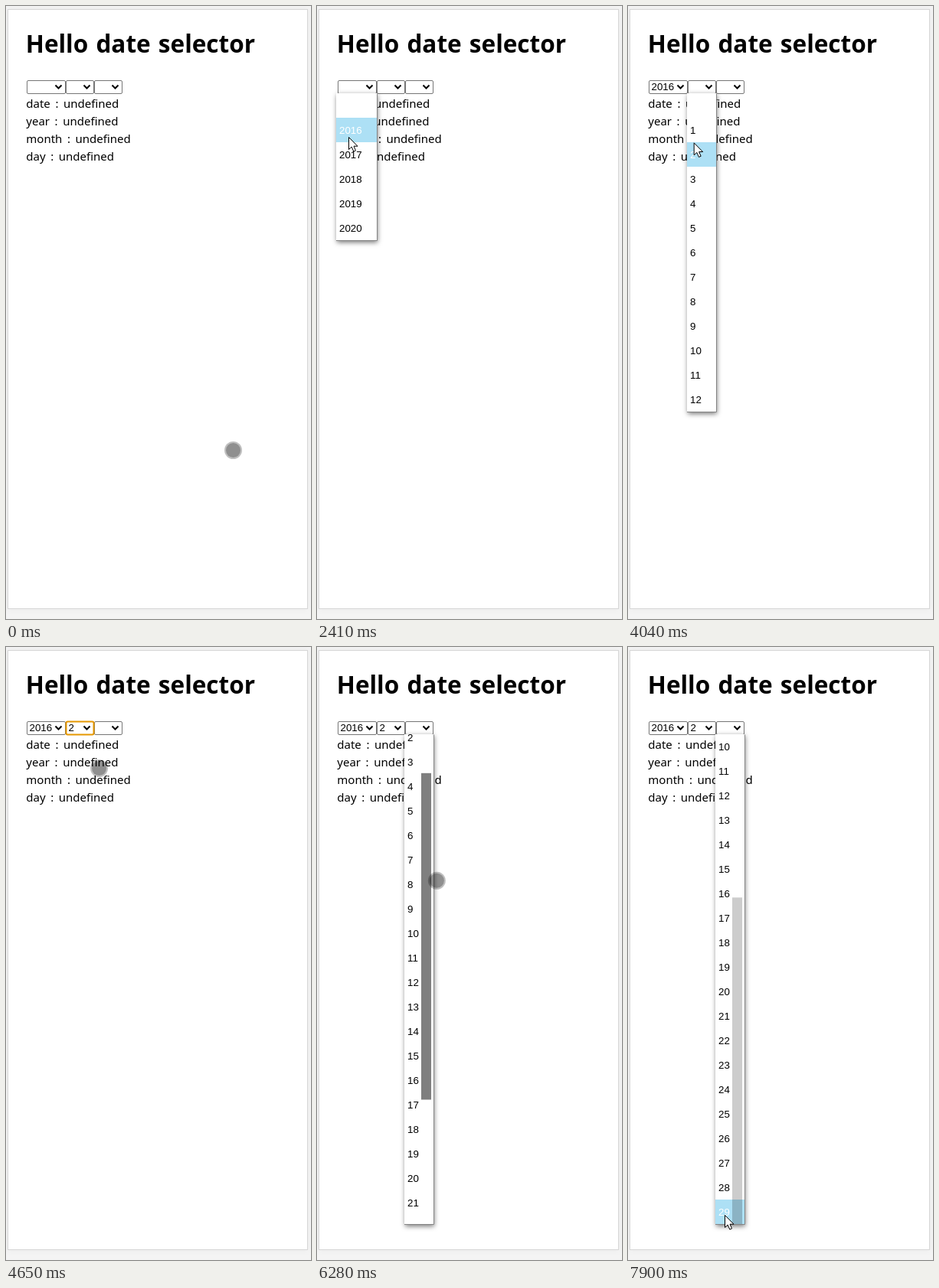
Animation of 398x801 px, one loop 8000 ms. Source, as an HTML page:

```html
<!DOCTYPE html>
<html lang="en">
<head>
<meta charset="utf-8">
<title>Date selector</title>
<style>
  html, body { margin: 0; width: 100%; height: 100%; overflow: hidden; background: #f4f4f4; }
  svg { display: block; }
  text { font: 15px "Noto Sans", sans-serif; white-space: pre; }
  .title { font-size: 31.5px; font-weight: 700; word-spacing: 2px; }
  .label { word-spacing: 2.7px; }
  .ui { font: 13.333px "Liberation Sans", Arial, sans-serif; }
  .sheet { fill: #fff; stroke: #d6d6d6; filter: drop-shadow(0 0 4px #0000000c); }
  .select { fill: #fff; stroke: #767676; }
  .chevron { fill: none; stroke: #000; stroke-width: 2; }
  .ring { fill: none; stroke: #e59700; stroke-width: 2; }
  .menu { fill: #fff; filter: drop-shadow(1px 2px 3px #0008); }
  .edge { fill: none; stroke: #858585; }
</style>
</head>
<body>
<svg width="398" height="801" viewBox="0 0 398 801">
  <rect class="sheet" x="2.5" y="4.5" width="391" height="783"/>
  <text class="title" x="25.8" y="61">Hello date selector</text>
  <g id="labels"></g>
  <g id="selects"></g>
  <g id="live"></g>
</svg>
<script>
const LOOP = 8000, STEP = 202, LEAD = 14;
const TOP = 114, ROW = 32, MAX_HEIGHT = 640, GRAB_Y = 254, BAR_X = 22;

const range = (from, to) => ['', ...Array.from({ length: to - from + 1 }, (_, i) => from + i)];
const clamp = (v, low, high) => Math.max(low, Math.min(v, high));
const byId = id => document.getElementById(id);

// Each menu is open during the steps from `opens` up to `closes`
const selects = [
  { x: 27, w: 51, menuX: 25, options: range(2016, 2020), opens: 6, closes: 13, value: 2016 },
  { x: 78, w: 37, menuX: 77, options: range(1, 12), opens: 18, closes: 22, value: 2 },
  { x: 115, w: 37, menuX: 114, options: range(1, 29), opens: 25, closes: Infinity }
];

// Pointer stops, eased in between
const stops = [
  { at: 0, x: 296, y: 580 },
  { at: 6, x: 67, y: 109 },
  { at: 10, x: 44, y: 258 },
  { at: 12, x: 42, y: 172 },
  { at: 17, x: 101, y: 111 },
  { at: 21, x: 84, y: 192 },
  { at: 23, x: 121, y: 158 },
  { at: 25, x: 141, y: 109 },
  { at: 26, x: 139, y: 119 },
  { at: 30, x: 153, y: GRAB_Y },
  { at: 33, x: 164, y: 450 },
  { at: 36, x: 139, y: 648 },
  { at: 39, x: 127, y: 743 }
];
const LAST = stops[stops.length - 1].at;

function pointerAt(step) {
  const next = Math.max(1, stops.findIndex(s => s.at >= step));
  const a = stops[next - 1], b = stops[next];
  const u = (step - a.at) / (b.at - a.at), ease = u * u * (3 - 2 * u);
  return { x: a.x + (b.x - a.x) * ease, y: a.y + (b.y - a.y) * ease };
}

byId('labels').innerHTML = ['date', 'year', 'month', 'day']
  .map((name, i) => `<text class="label" x="26.3" y="${133 + 23 * i}">${name} : undefined</text>`).join('');

byId('selects').innerHTML = selects.map(({ x, w }) =>
  `<rect class="select" x="${x + .5}" y="97.5" width="${w - 1}" height="17" rx="1.5"/>
   <path class="chevron" d="M${x + w - 13.5} 103.5l4 4l4-4"/>`).join('');

function drawValue(s, focused) {
  const ring = focused
    ? `<rect class="ring" x="${s.x + .5}" y="97.5" width="${s.w - 1}" height="17" rx="2"/>` : '';
  return `<text class="ui" x="${s.x + 3.5}" y="110">${s.value}</text>${ring}`;
}

function drawMenu({ menuX, x, w, options }, pointer, inside) {
  const width = x + w - menuX;
  const total = options.length * ROW, height = Math.min(total, MAX_HEIGHT), ratio = height / total;
  const scrollable = ratio < 1;
  const travel = clamp(pointer.y - GRAB_Y, 0, height * (1 - ratio));
  const scroll = travel / ratio;
  const overRows = inside && !(scrollable && pointer.x >= menuX + BAR_X);
  const active = overRows ? Math.floor((pointer.y - TOP + scroll) / ROW) : 0;
  const dragging = pointer.x > menuX + width;

  const rows = options.map((label, i) => {
    const y = i * ROW - scroll, lit = i === active;
    return (lit ? `<rect y="${y}" width="${width}" height="${ROW}" fill="#ade0f5"/>` : '') +
      `<text class="ui" x="4" y="${y + 21}" fill="${lit ? '#fff' : '#000'}">${label}</text>`;
  }).join('');
  const thumb = scrollable
    ? `<rect x="${BAR_X}" y="${travel}" width="13" height="${height * ratio}" fill-opacity="${dragging ? .5 : .2}"/>` : '';

  return `<rect class="menu" x="${menuX}" y="${TOP}" width="${width}" height="${height + 1}"/>
    <svg x="${menuX}" y="${TOP}" width="${width}" height="${height}">${rows}${thumb}</svg>
    <path class="edge" d="M${menuX} ${TOP + height + .5}h${width + .5}v${-height}"/>`;
}

function drawPointer({ x, y }, isArrow) {
  const shape = isArrow
    ? '<path fill="#fff" stroke="#000" d="M0 0V16L3.7 12.6L6.3 18.6L9 17.4L6.5 11.7H11.5Z"/>'
    : '<g fill-opacity=".25"><circle r="11.5"/><circle r="9.5"/></g>';
  const shift = isArrow ? -.5 : .5;
  return `<g transform="translate(${x + shift} ${y + shift})">${shape}</g>`;
}

function draw(step) {
  const pointer = pointerAt(step);
  const current = selects.filter(s => s.opens <= step).pop();
  const open = current && step < current.closes;
  const inside = open && pointer.y >= TOP &&
    pointer.x >= current.menuX && pointer.x <= current.x + current.w;

  byId('live').innerHTML =
    selects.filter(s => step >= s.closes).map(s => drawValue(s, s === current)).join('') +
    (open ? drawMenu(current, pointer, inside) : '') +
    drawPointer(pointer, inside);
}

const start = performance.now();
let shown = -1;
function tick() {
  const time = (performance.now() - start) % LOOP;
  const step = Math.min(Math.floor((time + LEAD) / STEP), LAST);
  if (step !== shown) draw(shown = step);
  requestAnimationFrame(tick);
}
tick();
</script>
</body>
</html>
```
